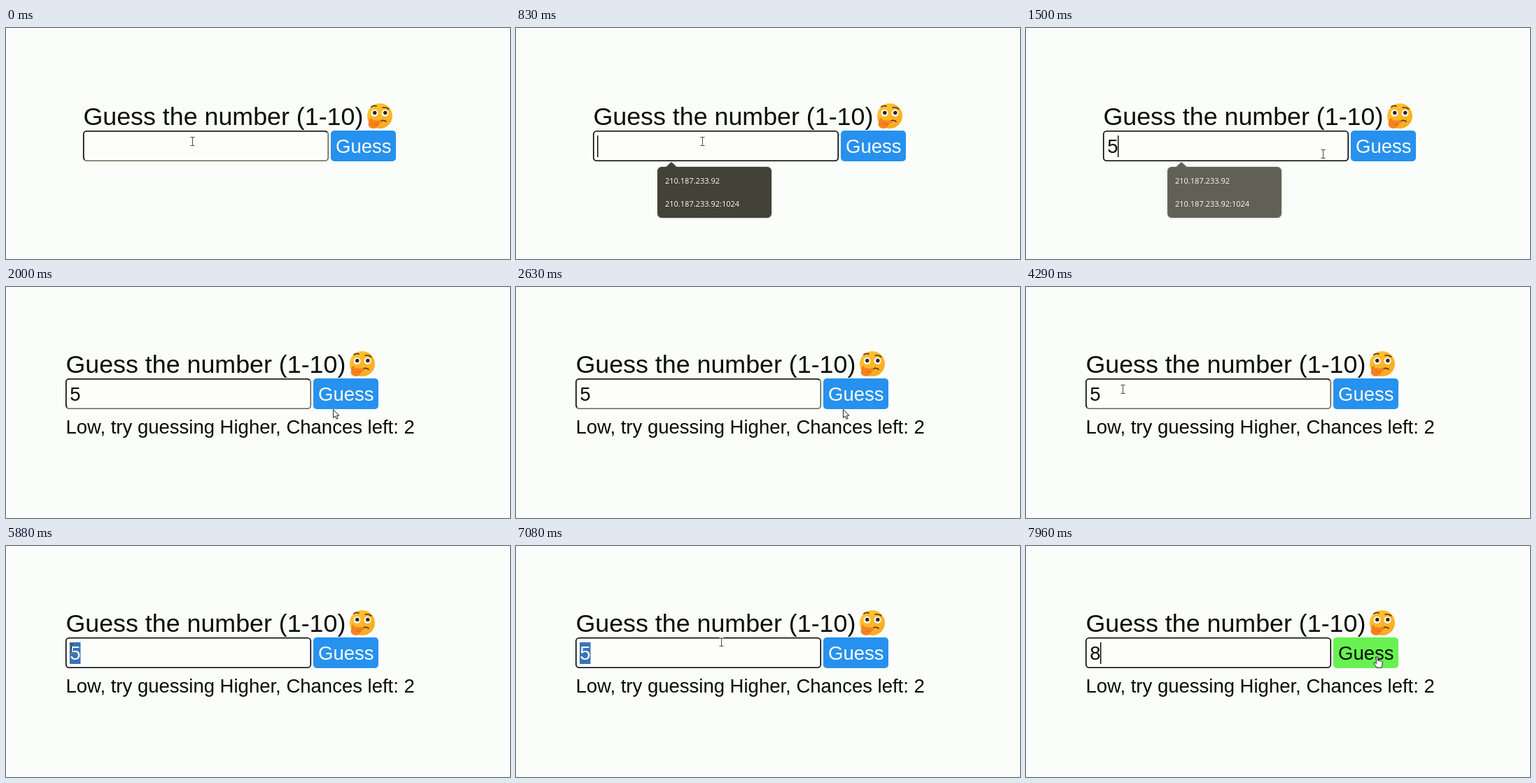
An HTML page with a canvas for the animation above (8 s loop, 720 by 331 pixels).

```html
<!DOCTYPE html>
<html lang="en">
<head>
<meta charset="utf-8">
<title>Guess the number</title>
<style>
  html, body { margin: 0; width: 100%; height: 100%; overflow: hidden; background: #fbfdfb; }
  canvas { display: block; }
</style>
</head>
<body>
<canvas id="stage" width="720" height="331"></canvas>
<script>
const ctx = document.getElementById('stage').getContext('2d');
const LOOP = 8000;
const SANS = '"Liberation Sans", Arial, sans-serif';
const BG = '#fbfdfb', FIELD = '#fdfdfb', INK = '#0a0a08';
const BOX = { w: 350, h: 44 };
const BUTTON = { dx: 354, w: 93, h: 44 };
const SIZE = 27.5;

// Moments of the interaction, in ms
const AT = { focus: 450, type5: 1400, popupFade: 1455, submit: 1900,
             press: 4780, select: 5060, type8: 7440 };

// Pointer path: time, x, y
const PATH = [
  [0, 266, 163], [800, 266, 163], [1500, 424, 182], [1640, 467, 176],
  [2750, 467, 176], [4250, 138, 147], [4400, 138, 147], [4750, 114, 148],
  [4850, 114, 148], [5300, 93, 147], [6250, 93, 147], [7040, 293, 138],
  [7300, 293, 138], [7880, 501, 159], [8000, 501, 159]
];

const ease = p => p * p * (3 - 2 * p);
const within = (p, x, y, w, h) => p.x >= x && p.x < x + w && p.y >= y && p.y < y + h;

function pointerAt(t) {
  const i = Math.max(1, PATH.findIndex(k => k[0] > t));
  const [t0, x0, y0] = PATH[i - 1], [t1, x1, y1] = PATH[i];
  const p = ease((t - t0) / (t1 - t0));
  return { x: x0 + (x1 - x0) * p, y: y0 + (y1 - y0) * p };
}

function text(str, x, y, size, color, font = SANS) {
  ctx.font = `${size}px ${font}`;
  ctx.fillStyle = color;
  ctx.fillText(str, x, y);
}

function disc(x, y, rx, color, ry = rx, turn = 0) {
  ctx.beginPath();
  ctx.ellipse(x, y, rx, ry, turn, 0, Math.PI * 2);
  ctx.fillStyle = color;
  ctx.fill();
}

function curve(color, width, x0, y0, cx, cy, x1, y1) {
  ctx.beginPath();
  ctx.moveTo(x0, y0);
  ctx.quadraticCurveTo(cx, cy, x1, y1);
  ctx.strokeStyle = color;
  ctx.lineWidth = width;
  ctx.stroke();
}

function drawEmoji(x, y) {
  ctx.save();
  ctx.translate(x, y);
  ctx.lineCap = 'round';
  const skin = ctx.createLinearGradient(-10, -18, 10, 18);
  skin.addColorStop(0, '#ffc534');
  skin.addColorStop(1, '#fba81c');
  disc(0, 0, 18, skin);
  for (const side of [-1, 1]) {
    disc(side * 7.5, -4, 5, '#fffdf6');
    disc(side * 7.5 + 0.3, -4.5, 2.7, '#2d2320');
  }
  curve('#56341f', 1.7, -12, -13, -9, -15.5, -5, -14);
  curve('#56341f', 1.7, 4, -12, 9, -13, 12.5, -10);
  curve('#56341f', 1.7, 1, 7.5, 5, 5, 9, 8);
  disc(-9, 12, 7.5, '#f5821f', 6);
  curve('#f5821f', 4, -14, 11, -14, 7, -13, 5);
  curve('#f5821f', 4, -8, 9.5, -3, 8, 1, 8.5);
  curve('#d9640f', 1, -8, 12, -4, 11.5, -1, 11.5);
  ctx.restore();
}

function drawPopup(alpha) {
  if (alpha <= 0) return;
  ctx.save();
  ctx.globalAlpha = alpha;
  ctx.beginPath();
  ctx.roundRect(202, 199, 163, 73, 6);
  ctx.moveTo(214, 199.5);
  ctx.lineTo(222, 192);
  ctx.lineTo(230, 199.5);
  ctx.fillStyle = '#424236';
  ctx.shadowColor = 'rgba(90, 90, 40, .4)';
  ctx.shadowBlur = 3;
  ctx.fill();
  ctx.restore();
  const font = '"Open Sans", "Noto Sans", sans-serif';
  text('210.187.233.92', 213, 223, 11, BG, font);
  text('210.187.233.92:1024', 213, 256, 11, BG, font);
}

// Idle border is inset: dark on the top and left, lighter on the others
function drawField(x, y, focused) {
  const l = x + 0.75, t = y + 0.75, r = l + BOX.w - 0.5, b = t + BOX.h - 1.5;
  ctx.beginPath();
  ctx.roundRect(l, t, r - l, b - t, 4.5);
  ctx.fillStyle = FIELD;
  ctx.fill();
  ctx.lineWidth = 1.6;
  ctx.strokeStyle = focused ? '#000' : '#67674f';
  ctx.stroke();
  if (focused) return;
  ctx.beginPath();
  ctx.moveTo(l + 1.5, b - 1.5);
  ctx.lineTo(l, b - 4.5);
  ctx.arcTo(l, t, l + 4.5, t, 4.5);
  ctx.lineTo(r - 4.5, t);
  ctx.lineTo(r - 1.5, t + 1.5);
  ctx.strokeStyle = '#17170f';
  ctx.stroke();
}

function drawBeam() {
  ctx.globalCompositeOperation = 'difference';
  ctx.strokeStyle = '#b0b0b0';
  ctx.lineWidth = 1;
  ctx.beginPath();
  ctx.moveTo(-3, -6); ctx.lineTo(3, -6);
  ctx.moveTo(0, -5.5); ctx.lineTo(0, 5.5);
  ctx.moveTo(-3, 6); ctx.lineTo(3, 6);
  ctx.stroke();
}

function drawShape(path) {
  const shape = new Path2D(path);
  ctx.lineJoin = 'round';
  ctx.lineWidth = 1;
  ctx.strokeStyle = '#222';
  ctx.fillStyle = '#fff';
  ctx.fill(shape);
  ctx.stroke(shape);
}

const ARROW = 'M0 0V12L2.8 9.4L4.7 13.7L6.6 12.9L4.8 8.7H8.4Z';
const HAND = 'M-1.2 0.4Q0 -1 1.2 0.4V6Q2.5 5 3.6 6.2Q5 5.6 5.8 6.8Q7.4 6.4 7.6 8' +
             'V11.5Q7.4 13.5 6.4 16H-0.4Q-1.6 13-4.4 10.2Q-5 8.2-3 8.6L-1.2 10Z';

function drawPointer(p, kind) {
  ctx.save();
  ctx.translate(Math.floor(p.x) + 0.5, Math.floor(p.y) - 0.5);
  if (kind === 'beam') drawBeam();
  else drawShape(kind === 'hand' ? HAND : ARROW);
  ctx.restore();
}

function caretOn(t) {
  const since = t >= AT.type8 ? AT.type8 : t >= AT.press ? AT.press
    : t >= AT.type5 ? AT.type5 : AT.focus;
  return (t - since) % 1060 < 530;
}

function draw(t) {
  const answered = t >= AT.submit;
  const x = answered ? 85 : 110;
  const y = answered ? 131 : 147;
  const pointer = pointerAt(t);
  const hover = within(pointer, x + BUTTON.dx, y, BUTTON.w, BUTTON.h);
  const inBox = within(pointer, x, y, BOX.w, BOX.h);
  const focused = t >= AT.focus && t < AT.submit - 90 || t >= AT.press;
  const selected = t >= AT.select && t < AT.type8;
  const value = t < AT.type5 ? '' : t < AT.type8 ? '5' : '8';

  ctx.fillStyle = BG;
  ctx.fillRect(0, 0, 720, 331);

  text('Guess the number (1-10)', x + 0.4, y - 8.5, 35.8, INK);
  drawEmoji(x + 424, y - 21);

  drawField(x, y, focused);
  if (selected) {
    ctx.fillStyle = '#3a72b8';
    ctx.fillRect(x + 6, y + 7, 15.5, 31);
  }
  text(value, x + 6.3, y + 32, SIZE, selected ? '#fafaf4' : INK);
  if (focused && !selected && caretOn(t)) {
    ctx.fillStyle = '#000';
    ctx.fillRect(x + (value ? 21 : 6), y + 7, 1.4, 31);
  }

  ctx.beginPath();
  ctx.roundRect(x + BUTTON.dx, y, BUTTON.w, BUTTON.h, 5);
  ctx.fillStyle = hover ? '#68f251' : '#2691ee';
  ctx.fill();
  text('Guess', x + BUTTON.dx + 7, y + 32, SIZE, hover ? INK : '#fcfcf8');

  if (answered) {
    text('Low, try guessing Higher, Chances left: 2', x + 0.5, y + 79, SIZE, INK);
  }
  if (t >= AT.focus) drawPopup(Math.min(1, 1 - (t - AT.popupFade) / 200));

  drawPointer(pointer, hover ? 'hand' : inBox ? 'beam' : 'arrow');
}

const start = performance.now();
function tick() {
  draw((performance.now() - start) % LOOP);
  requestAnimationFrame(tick);
}
tick();
</script>
</body>
</html>
```
